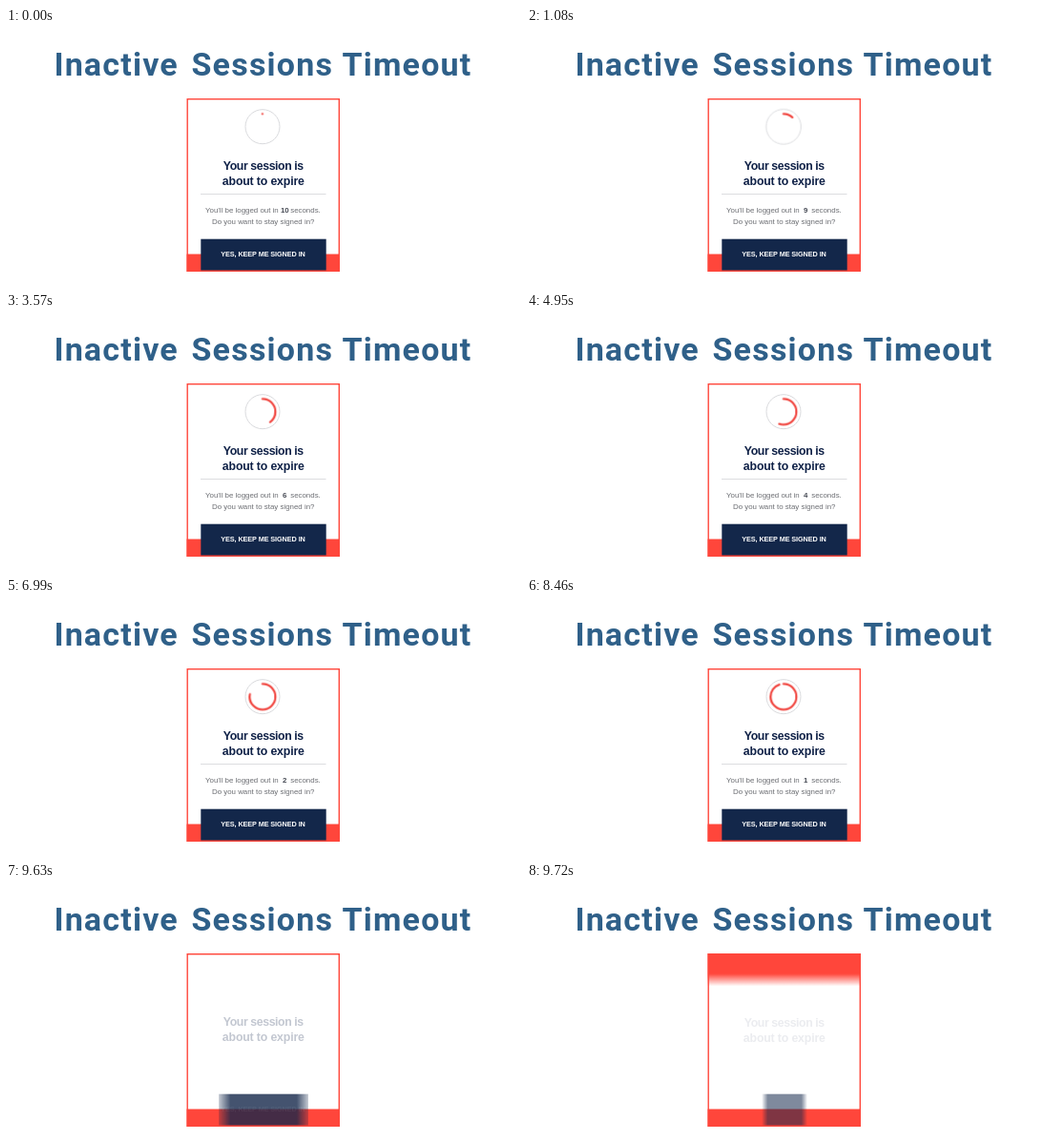
Animation, 540 px wide and 270 px high, one loop 9750 ms. Source, as an HTML page:

```html
<!DOCTYPE html>
<html lang="en">
<head>
<meta charset="utf-8">
<title>Inactive Sessions Timeout</title>
<style>
  html, body { margin: 0; height: 100%; overflow: hidden; background: #fff; }
  svg { display: block; width: 100vw; height: 100vh; }
  :root { --red: #ff463b; --navy: #13274a; --loop: 9.75s linear infinite; }
  text { font-family: "Liberation Sans", Arial, sans-serif; white-space: pre; }

  .title text { font: 700 34px Roboto, sans-serif; letter-spacing: 1.2px; fill: #2f6089; }
  .heading text { font-size: 12.3px; font-weight: 700; fill: #0f2147; text-anchor: middle; }
  .body text { font-size: 7.9px; fill: #6c6e73; }
  .body .digits text { font-weight: 700; fill: #474b55; text-anchor: middle; }
  .label { font-size: 7.3px; font-weight: 700; letter-spacing: -.1px; fill: #fff; text-anchor: middle; }

  .dial, .pulse, .button, .rule { transform-box: fill-box; transform-origin: center; }
  .pulse { fill: none; stroke: #d9dadd; vector-effect: non-scaling-stroke; animation: pulse var(--loop); }
  .arc { fill: none; stroke: #f0443e; stroke-width: 2.2; stroke-linecap: round; animation: sweep var(--loop); }
  .dial { animation: dial-out var(--loop); }
  .digits { animation: count 9.75s step-end infinite; }
  .body { animation: body-out var(--loop); }
  .rule { fill: #dcdde0; animation: rule-out var(--loop); }
  .heading { animation: heading-out var(--loop); }
  .button { animation: button-out var(--loop); }
  .edge { stop-color: var(--navy); animation: soften var(--loop); }
  .core { stop-color: var(--navy); }
  .label { animation: label-out var(--loop); }
  .sheet { animation: drop var(--loop); }

  @keyframes sweep {
    0% { stroke-dasharray: 0 200; }
    91.6%, 100% { stroke-dasharray: 100 200; }
  }
  @keyframes pulse {
    0%, 9.85%, 30.57%, 50.87%, 71.49%, 91.69% { transform: scale(1); opacity: 1; }
    9.85%, 50.87% { animation-timing-function: cubic-bezier(.33, .67, .67, 1); }
    30.56%, 71.48% { transform: scale(1.28); opacity: .2; }
    100% { transform: scale(1.18); opacity: .68; }
  }
  @keyframes count {
    0% { transform: translateY(0); }
    4.58% { transform: translateY(-12px); }
    13.74% { transform: translateY(-24px); }
    22.9% { transform: translateY(-36px); }
    32.05% { transform: translateY(-48px); }
    41.21% { transform: translateY(-60px); }
    50.37% { transform: translateY(-72px); }
    59.53% { transform: translateY(-84px); }
    68.68% { transform: translateY(-96px); }
    77.84% { transform: translateY(-108px); }
    87%, 100% { transform: translateY(-120px); }
  }
  @keyframes dial-out { 0%, 92% { opacity: 1; } 97.4%, 100% { opacity: 0; } }
  @keyframes body-out { 0%, 92.3% { opacity: 1; } 97.6%, 100% { opacity: 0; } }
  @keyframes rule-out { 0%, 92% { transform: scaleX(1); } 96.6%, 100% { transform: scaleX(0); } }
  @keyframes heading-out {
    0%, 94.7% { opacity: 1; transform: translateY(0); }
    96.4% { opacity: .69; transform: translateY(.2px); }
    100% { opacity: .03; transform: translateY(2px); }
  }
  @keyframes button-out {
    0% { transform: scaleX(1); opacity: 1; }
    96.9% { transform: scaleX(1); opacity: 1; animation-timing-function: cubic-bezier(.33, 0, .67, .33); }
    100% { transform: scaleX(.22); opacity: .44; }
  }
  @keyframes soften { 0%, 97% { stop-opacity: 1; } 99.6%, 100% { stop-opacity: 0; } }
  @keyframes label-out { 0%, 96.9% { opacity: 1; } 98.9%, 100% { opacity: 0; } }
  @keyframes drop {
    0% { transform: translateY(0); }
    98.46% { transform: translateY(0); animation-timing-function: cubic-bezier(.33, 0, .67, .33); }
    100% { transform: translateY(53px); }
  }
</style>
</head>
<body>
<svg viewBox="0 0 540 270" preserveAspectRatio="none">
  <defs>
    <linearGradient id="buttonFill">
      <stop class="edge" offset="0"/>
      <stop class="core" offset=".13"/>
      <stop class="core" offset=".87"/>
      <stop class="edge" offset="1"/>
    </linearGradient>
    <linearGradient id="sheetFill" x2="0" y2="1">
      <stop offset=".87" stop-color="#ff463b"/>
      <stop offset="1" stop-color="#ff463b" stop-opacity="0"/>
    </linearGradient>
    <clipPath id="card"><rect x="189.5" y="74" width="160.5" height="182"/></clipPath>
    <clipPath id="digitWindow"><rect x="285" y="186" width="14" height="11"/></clipPath>
  </defs>

  <g class="title">
    <text x="50.5" y="49.5">Inactive</text>
    <text x="194.5" y="49.5">Sessions</text>
    <text x="352.5" y="49.5">Timeout</text>
  </g>

  <rect x="190.2" y="74.7" width="159.1" height="180.6" fill="#fff" stroke="var(--red)" stroke-width="1.4"/>
  <rect x="189.5" y="237.5" width="160.5" height="18.5" fill="var(--red)"/>

  <g class="dial">
    <circle class="pulse" cx="269" cy="103.7" r="18"/>
    <circle class="arc" cx="269" cy="103.7" r="13.5" pathLength="100" transform="rotate(-90 269 103.7)"/>
  </g>

  <g class="heading">
    <text x="269.8" y="148.7" letter-spacing="-.4">Your session is</text>
    <text x="269.8" y="165" letter-spacing="-.15">about to expire</text>
  </g>
  <rect class="rule" x="204" y="174" width="131.5" height="1"/>

  <g class="body">
    <text x="209" y="194.3">You'll be logged out in</text>
    <g clip-path="url(#digitWindow)"><g class="digits" id="digits"></g></g>
    <text x="298.2" y="194.3">seconds.</text>
    <text x="269.7" y="206.3" text-anchor="middle">Do you want to stay signed in?</text>
  </g>

  <rect class="button" x="204.3" y="221.7" width="131.4" height="32.8" fill="url(#buttonFill)"/>
  <text class="label" x="269.5" y="240.4">YES, KEEP ME SIGNED IN</text>

  <g clip-path="url(#card)">
    <rect class="sheet" x="189.5" y="-26" width="160.5" height="100" fill="url(#sheetFill)"/>
  </g>
</svg>
<script>
  // Stack the countdown numbers in a strip that moves behind a one-line window.
  const strip = document.getElementById('digits');
  for (let i = 0; i <= 10; i++) {
    const number = document.createElementNS('http://www.w3.org/2000/svg', 'text');
    number.setAttribute('x', 292.3);
    number.setAttribute('y', 194.3 + 12 * i);
    number.textContent = 10 - i;
    strip.append(number);
  }
</script>
</body>
</html>
```
